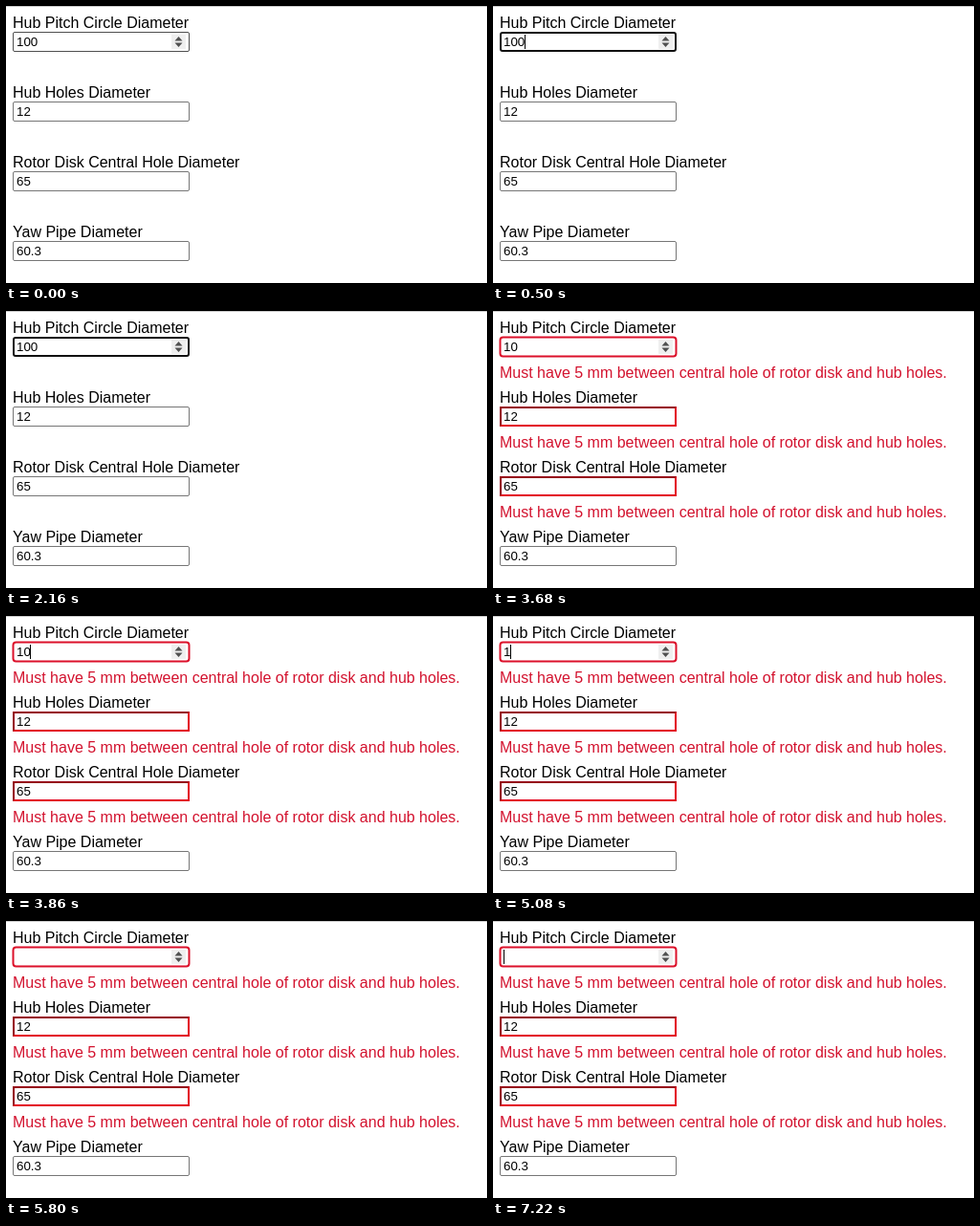
Animation of 503x290 px, one loop 8000 ms. Source, as an HTML page:

```html
<!DOCTYPE html>
<html lang="en">
<head>
<meta charset="utf-8">
<title>Form validation</title>
<style>
  html, body { margin: 0; width: 100%; height: 100%; overflow: hidden; background: #fff; }
  svg { display: block; font-family: "Liberation Sans", Arial, sans-serif; }
  text { white-space: pre; }
  .label, .error { font-size: 16px; }
  .error { fill: #d3122e; }
  .value { font-size: 13.3333px; }
  .plain { fill: #fff; stroke: #767676; }
  .hover { fill: #fff; stroke: #4f4f4f; }
  .focus { fill: #fff; stroke: #101010; stroke-width: 2; }
  .ring { fill: #fff; stroke: #dc102a; stroke-width: 2; }
</style>
</head>
<body>
<svg id="stage" width="503" height="290" viewBox="0 0 503 290"></svg>
<script>
const SVG_NS = "http://www.w3.org/2000/svg";
const stage = document.getElementById("stage");
const LOOP = 8000;
const LEFT = 7, FIELD_W = 185, FIELD_H = 21, ROW_H = 73, TEXT_X = 11;
const MESSAGE = "Must have 5 mm between central hole of rotor disk and hub holes.";
const ROWS = [
  ["Hub Pitch Circle Diameter", "100"],
  ["Hub Holes Diameter", "12"],
  ["Rotor Disk Central Hole Diameter", "65"],
  ["Yaw Pipe Diameter", "60.3"]
];
const CARET_X = [11, 18, 25, 33];

// start time, value, caret shown
const STEPS = [
  [0, "100", false],
  [500, "100", true],
  [2160, "100", false],
  [3680, "10", false],
  [3860, "10", true],
  [5080, "1", true],
  [5540, "1", false],
  [5800, "", false],
  [7220, "", true]
];
const FOCUS_AT = 500, INVALID_AT = 3680;

function add(parent, tag, attrs, content = "") {
  const node = document.createElementNS(SVG_NS, tag);
  for (const name in attrs) node.setAttribute(name, attrs[name]);
  node.textContent = content;
  parent.appendChild(node);
  return node;
}

function box(parent, kind, top, inset, rx) {
  return add(parent, "rect", {
    class: kind, x: LEFT + inset, y: top + inset,
    width: FIELD_W - 2 * inset, height: FIELD_H - 2 * inset, rx
  });
}

function insetBorder(parent, top) {
  const right = LEFT + FIELD_W, bottom = top + FIELD_H;
  add(parent, "rect", { x: LEFT, y: top, width: FIELD_W, height: FIELD_H, fill: "#e3001b" });
  add(parent, "path", {
    d: `M${LEFT} ${bottom}V${top}H${right}l-2 2H${LEFT + 2}V${bottom - 2}z`, fill: "#960012"
  });
  add(parent, "rect", {
    x: LEFT + 2, y: top + 2, width: FIELD_W - 4, height: FIELD_H - 4, fill: "#fff"
  });
}

const show = (node, on) => node.setAttribute("visibility", on ? "visible" : "hidden");

add(stage, "rect", { width: 503, height: 290, fill: "#fff" });
add(stage, "rect", { width: 503, height: 1, fill: "#d3d3d3" });

const frames = add(stage, "g", {});
const errors = add(stage, "g", {});
const values = [];

ROWS.forEach(([label, value], i) => {
  const top = 27 + i * ROW_H;
  if (i > 0) box(frames, "plain", top, 0.5, 1.5);
  if (i === 1 || i === 2) insetBorder(errors, top);
  if (i < 3) add(errors, "text", { class: "error", x: LEFT, y: top + 43 }, MESSAGE);
  add(stage, "text", { class: "label", x: LEFT, y: top - 4 }, label);
  values.push(add(stage, "text", { class: "value", x: TEXT_X, y: top + 15 }, value));
});

const hoverBox = box(frames, "hover", 27, 0.5, 1.5);
const focusBox = box(frames, "focus", 27, 1, 2);
const invalidBox = box(frames, "ring", 27, 0.5, 3);

add(stage, "rect", { x: 173, y: 30, width: 15, height: 15, fill: "#efefef" });
add(stage, "path", { d: "M176.5 36.5l4-4.5 4 4.5zM176.5 38.5h8l-4 4.5z", fill: "#505050" });
const caret = add(stage, "rect", { y: 30, width: 1, height: 15, fill: "#000" });

function render(time) {
  const [, value, caretOn] = STEPS.findLast(step => step[0] <= time);
  const invalid = time >= INVALID_AT;
  values[0].textContent = value;
  caret.setAttribute("x", CARET_X[value.length]);
  show(caret, caretOn);
  show(hoverBox, time < FOCUS_AT);
  show(focusBox, time >= FOCUS_AT && !invalid);
  show(invalidBox, invalid);
  show(errors, invalid);
}

const start = performance.now();
function tick() {
  render((performance.now() - start) % LOOP);
  requestAnimationFrame(tick);
}
tick();
</script>
</body>
</html>
```
